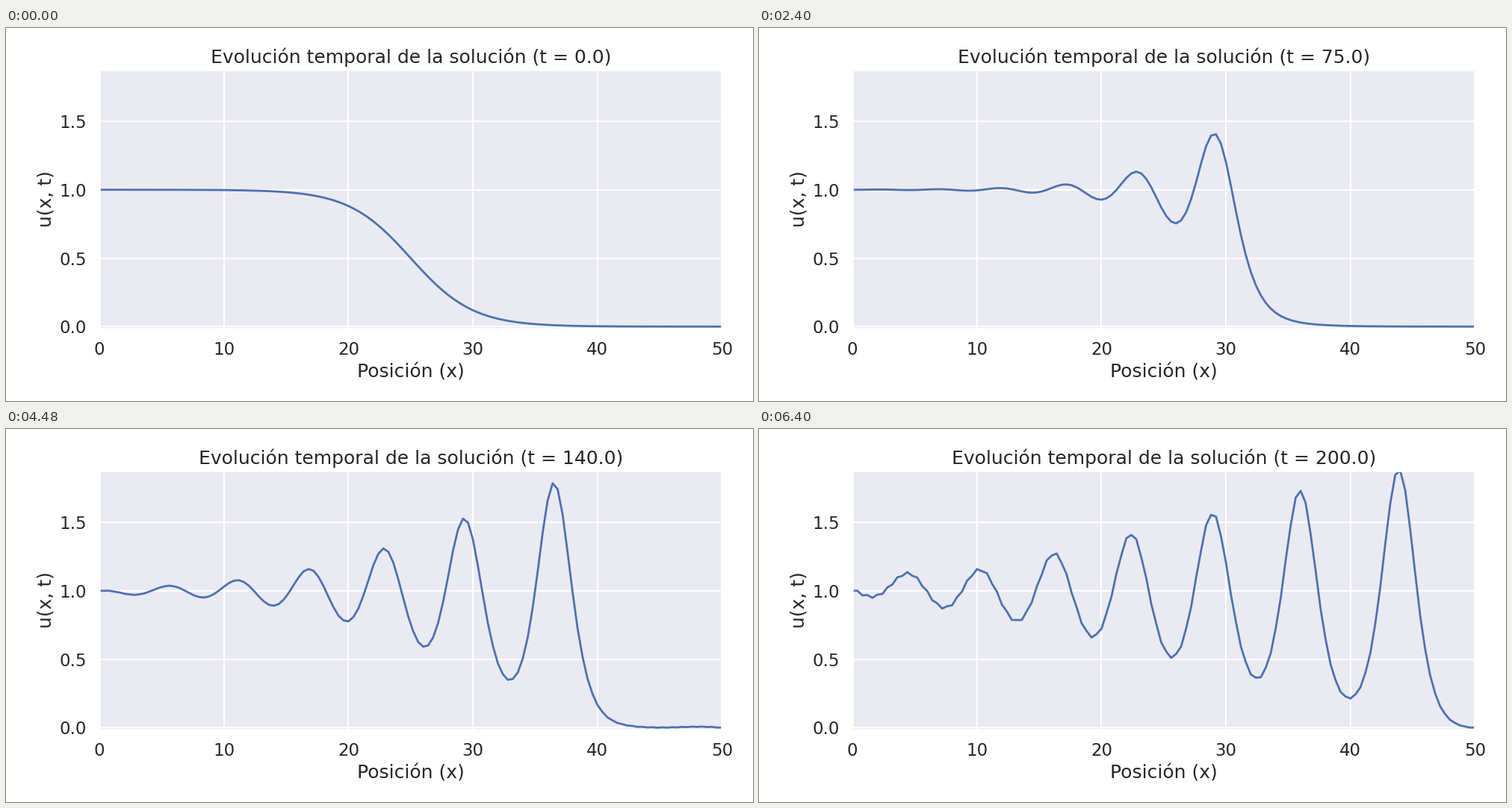
A matplotlib script for the animation above (6560 ms loop, 1000 by 500 pixels).

```python
import numpy as np
import matplotlib.pyplot as plt
from matplotlib.animation import FuncAnimation

# Korteweg-de Vries equation: u_t + EPS u u_x + MU u_xxx = 0
EPS, MU = 0.2, 0.1
DX, DT = 0.4, 0.1
POINTS, FRAMES, STEPS_PER_FRAME = 126, 41, 50

plt.rcParams.update({
    "font.family": "DejaVu Sans", "font.size": 18,
    "axes.titlesize": 18, "axes.labelsize": 18,
    "xtick.labelsize": 16.5, "ytick.labelsize": 16.5,
    "text.color": ".15", "axes.labelcolor": ".15",
    "xtick.color": ".15", "ytick.color": ".15",
    "axes.facecolor": "#EAEAF2", "axes.edgecolor": "white",
    "axes.linewidth": 1.875, "axes.axisbelow": True,
    "axes.grid": True, "grid.color": "white", "grid.linewidth": 1.5,
    "xtick.bottom": False, "ytick.left": False,
    "xtick.major.size": 9, "ytick.major.size": 9,
    "lines.solid_capstyle": "round",
})


def change(u):
    """Increment over two time steps; two cells at each end stay fixed."""
    left, mid, right = u[1:-3], u[2:-2], u[3:-1]
    slope = right - left
    third = u[4:] + 2 * left - 2 * right - u[:-4]
    delta = np.zeros_like(u)
    delta[2:-2] = (-EPS * DT / (3 * DX) * (left + mid + right) * slope
                   - MU * DT / DX**3 * third)
    return delta


def solve(x):
    previous = 0.5 * (1 - np.tanh(x / 5 - 5))
    current = previous + change(previous) / 2
    states = [previous]
    for step in range(1, (FRAMES - 1) * STEPS_PER_FRAME + 1):
        if step % STEPS_PER_FRAME == 0:
            states.append(current)
        previous, current = current, previous + change(current)
    return np.array(states)


def title_text(frame):
    time = frame * STEPS_PER_FRAME * DT
    return f"Evolución temporal de la solución (t = {time:.1f})"


x = np.arange(POINTS) * DX
states = solve(x)

fig, ax = plt.subplots(figsize=(10, 5), dpi=100)
line, = ax.plot(x, states[0], color="#4C72B0", linewidth=2)
ax.set(xlim=(0, 50), ylim=(states.min(), states.max()),
       xlabel="Posición (x)", ylabel="u(x, t)")
title = ax.set_title(title_text(0))
fig.tight_layout()


def update(frame):
    line.set_ydata(states[frame])
    title.set_text(title_text(frame))
    return line, title


animation = FuncAnimation(fig, update, frames=FRAMES, interval=160, repeat=True)
plt.show()
```
